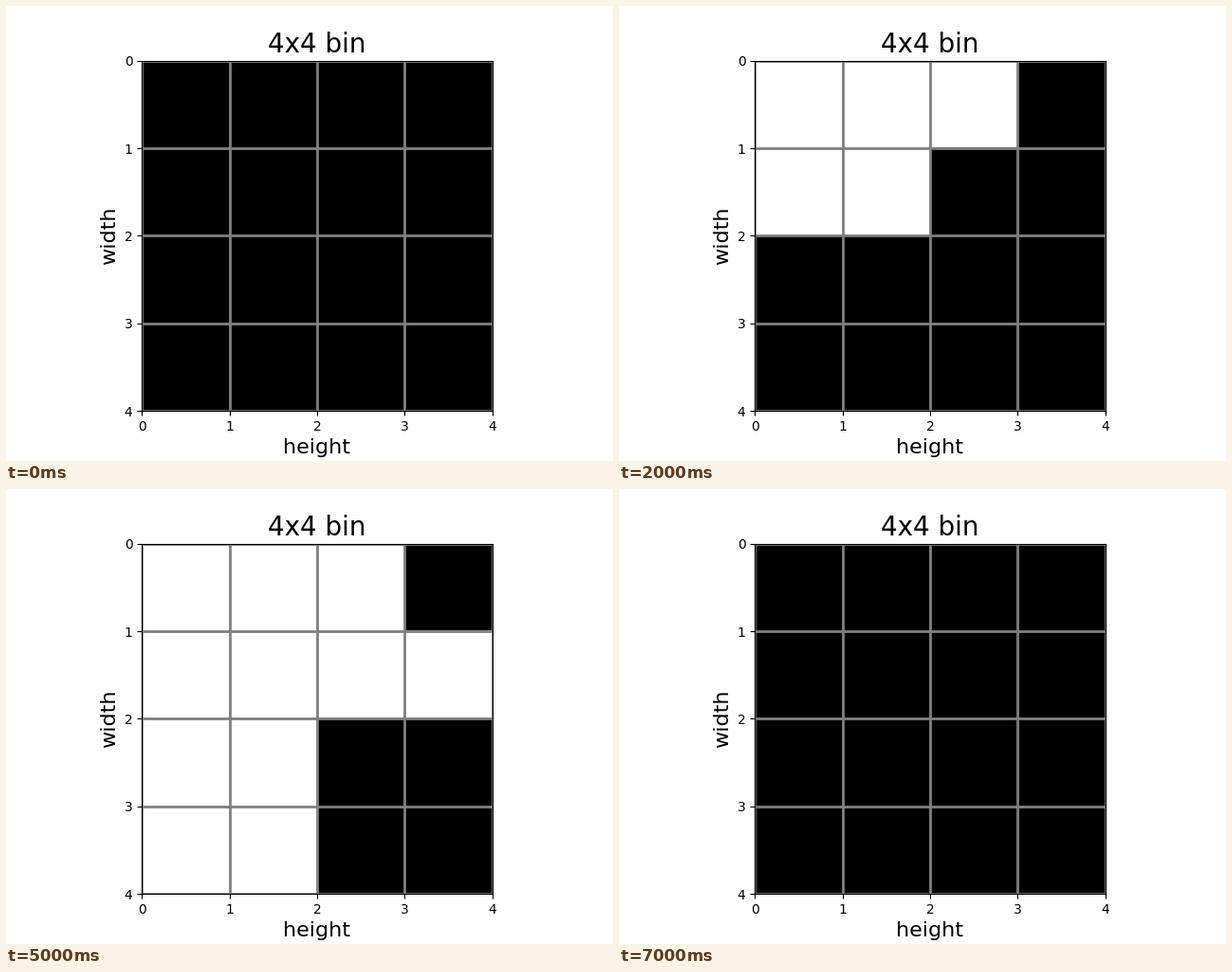
These frames come from a looping animation (640 by 480 pixels, 8 s). A matplotlib script:

```python
import matplotlib.pyplot as plt
import numpy as np
from matplotlib.animation import FuncAnimation

SIZE = 4
# Items in order of packing: row, column, side length
ITEMS = [(0, 2, 1), (0, 0, 2), (1, 2, 1), (2, 0, 2), (1, 3, 1), (2, 2, 2)]
FRAMES = len(ITEMS) + 2  # empty bin, one per item, empty bin again

plt.rcParams["font.family"] = "DejaVu Sans"


def packed(count):
    grid = np.zeros((SIZE, SIZE))
    for row, col, side in ITEMS[:count]:
        grid[row:row + side, col:col + side] = 1
    return grid


fig, ax = plt.subplots(figsize=(6.4, 4.8), dpi=100)
image = ax.imshow(packed(0), cmap="gray", vmin=0, vmax=1,
                  interpolation="nearest", extent=(0, SIZE, SIZE, 0))
ax.set_title("4x4 bin", fontsize=20)
ax.set_xlabel("height", fontsize=16)
ax.set_ylabel("width", fontsize=16)
ax.set_xticks(range(SIZE + 1))
ax.set_yticks(range(SIZE + 1))
ax.grid(color="gray", linestyle="-", linewidth=2)


def update(frame):
    image.set_data(packed(frame if frame <= len(ITEMS) else 0))
    return [image]


anim = FuncAnimation(fig, update, frames=FRAMES, interval=1000,
                     repeat=True, repeat_delay=0, blit=False)
plt.show()
```
